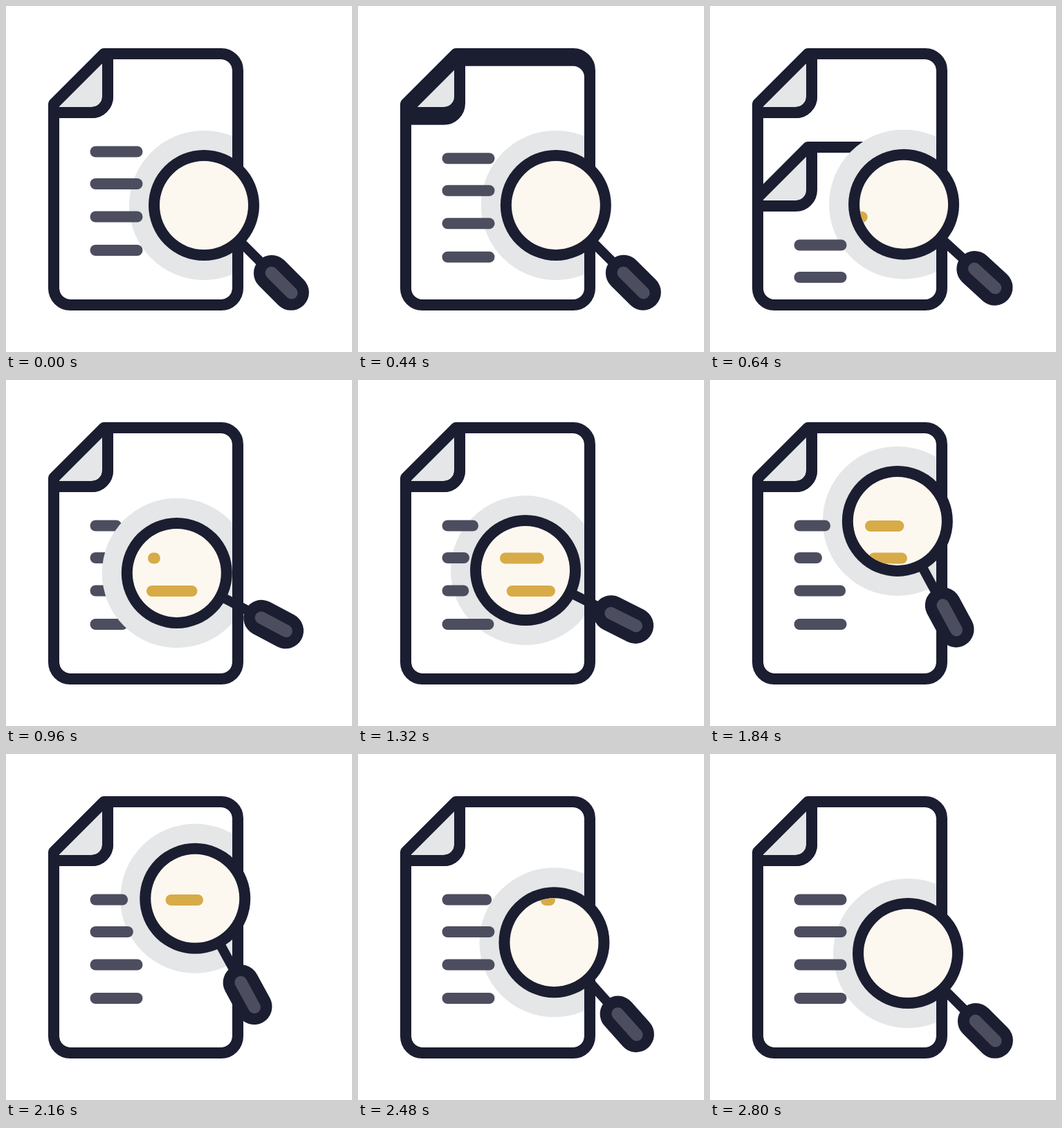
Write an HTML page with a canvas that moves like this. It is 500 px wide and 500 px high and loops after 3 s.

```html
<!DOCTYPE html>
<html>
<head>
<meta charset="utf-8">
<title>Document search</title>
<style>
html, body { margin: 0; width: 100%; height: 100%; overflow: hidden; background: #fff; }
canvas { display: block; }
</style>
</head>
<body>
<canvas id="stage" width="500" height="500"></canvas>
<script>
const ctx = document.getElementById('stage').getContext('2d');
const LOOP = 3000, STEP = 886;
const INK = '#1b1d31', TEXT = '#4c4e5f', GOLD = '#d7ab48', PALE = '#e4e6e7', CREAM = '#fdf8ef';
const TEXT_LEFT = 121.5, TEXT_RIGHT = 197.5, GOLD_RIGHT = 285, BAR = 16;

// Each row grows to "part", then completes around the time "finish".
// "gold" is the left end of its highlight inside the lens.
const ROWS = [
  { y: 210.5, part: 174, finish: 2354, gold: 224 },
  { y: 257, part: 161, finish: 2120, gold: 205 },
  { y: 304.5, part: 159, finish: 1585, gold: 203 },
  { y: 353, part: 181, finish: 1100 }
];

// Three moves that bring the lens back to its resting place
const REST = { x: 286, y: 288, angle: 45 };
const MOVES = [
  { mid: 800, x: -45, y: -10.4, angle: -19.6 },
  { mid: 1585, x: 31, y: -76.6, angle: 37.6 },
  { mid: 2354, x: 14, y: 87, angle: -18 }
];

const page = new Path2D('M141.5 69H311a24 24 0 0 1 24 24V408a24 24 0 0 1-24 24H93a24 24 0 0 1-24-24V141.5Z');
const fold = new Path2D('M147 69V131a23 23 0 0 1-23 23H69');
const flap = new Path2D('M147 69V131a23 23 0 0 1-23 23H69V141.5L141.5 69Z');

// Cubic ease in and out, half done at mid
function step(t, mid, span = STEP) {
  const u = Math.min(1, Math.max(0, (t - mid) / span + 0.5));
  return u < 0.5 ? 4 * u ** 3 : 1 - 4 * (1 - u) ** 3;
}

function lensAt(t) {
  const pose = { ...REST };
  for (const move of MOVES) {
    const p = step(t, move.mid);
    for (const key in pose) pose[key] += p * move[key];
  }
  return pose;
}

function disc(x, y, r, color) {
  ctx.fillStyle = color;
  ctx.beginPath();
  ctx.arc(x, y, r, 0, 2 * Math.PI);
  ctx.fill();
}

// Horizontal line; with round caps x1 and x2 are the outer ends
function bar(x1, x2, y, width, color, cap = 'round') {
  const inset = cap === 'round' ? width / 2 : 0;
  ctx.strokeStyle = color;
  ctx.lineWidth = width;
  ctx.lineCap = cap;
  ctx.beginPath();
  ctx.moveTo(x1 + inset, y);
  ctx.lineTo(Math.max(x2 - inset, x1 + inset + 0.01), y);
  ctx.stroke();
}

function outline() {
  ctx.strokeStyle = INK;
  ctx.lineWidth = 16;
  ctx.lineCap = 'butt';
  ctx.lineJoin = 'round';
  ctx.stroke(page);
  ctx.stroke(fold);
}

// A page with the halo of the lens under its text
function sheet(haloX, haloY, rowEnd) {
  ctx.fillStyle = '#fff';
  ctx.fill(page);
  ctx.fillStyle = PALE;
  ctx.fill(flap);
  outline();
  disc(haloX, haloY, 108, PALE);
  for (const row of ROWS) {
    const end = rowEnd(row);
    if (end > TEXT_LEFT + BAR) bar(TEXT_LEFT, end, row.y, BAR, TEXT);
  }
}

function highlights(t) {
  [...ROWS].reverse().filter(row => row.gold).forEach((row, i) => {
    const born = 800 + 430 * i;
    const grow = step(t, born), shrink = step(t, born + 650);
    if (grow < 0.02 || shrink > 0.97) return;
    const travel = GOLD_RIGHT - row.gold - BAR;
    bar(row.gold + travel * shrink, row.gold + BAR + travel * grow, row.y + 0.5, BAR, GOLD);
  });
}

function lens(t, { x, y, angle }) {
  ctx.save();
  ctx.translate(x, y);
  ctx.rotate(angle * Math.PI / 180);
  bar(74, 140, 0, 14, INK, 'butt');
  bar(112.5, 204, 0, 52, INK);
  bar(129, 188, 0, 18, TEXT);
  ctx.restore();

  disc(x, y, 80, INK);
  disc(x, y, 64, CREAM);
  ctx.save();
  ctx.beginPath();
  ctx.arc(x, y, 64, 0, 2 * Math.PI);
  ctx.clip();
  highlights(t);
  ctx.restore();
}

function draw(t) {
  const pose = lensAt(t);
  const drop = 370 * step(t, 679, 762);
  ctx.fillStyle = '#fff';
  ctx.fillRect(0, 0, 500, 500);

  ctx.save();
  ctx.clip(page);
  sheet(pose.x, pose.y, ({ part, finish }) =>
    TEXT_LEFT + (part - TEXT_LEFT) * step(t, 800) + (TEXT_RIGHT - part) * step(t, finish));
  if (drop < 370) {
    ctx.translate(0, drop);
    sheet(pose.x, pose.y - drop, () => TEXT_RIGHT);
  }
  ctx.restore();

  outline();
  lens(t, pose);
}

function tick() {
  draw(performance.now() % LOOP);
  requestAnimationFrame(tick);
}
tick();
</script>
</body>
</html>
```
